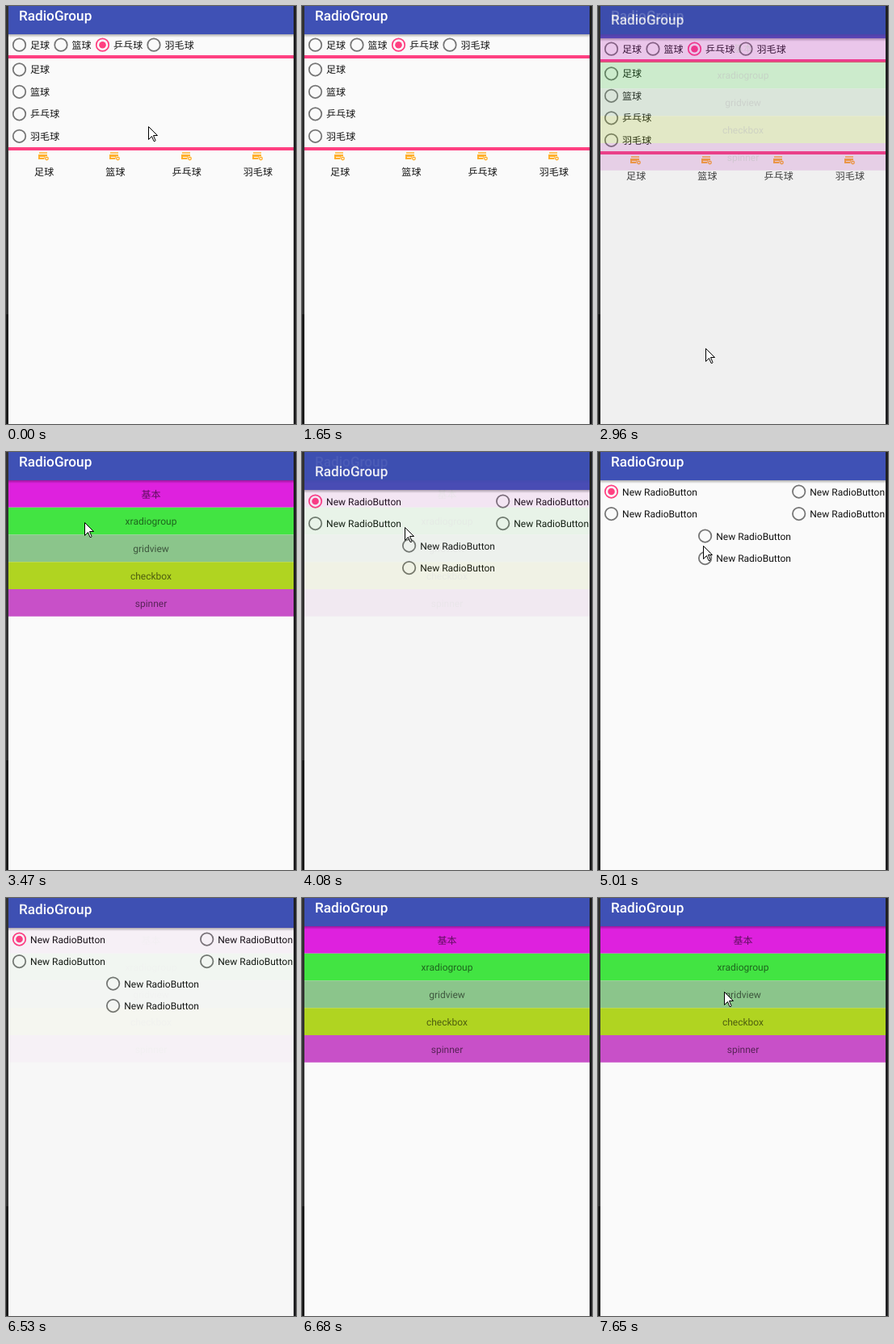
Recreate the animation shown at these times as an HTML page with a canvas. Size 359 by 518 pixels, loop 8 s.

```html
<!DOCTYPE html>
<html lang="zh-CN">
<head>
<meta charset="utf-8">
<title>RadioGroup</title>
<style>
html, body { margin: 0; width: 100%; height: 100%; overflow: hidden; background: #222; }
canvas { display: block; width: 359px; height: 518px; }
</style>
</head>
<body>
<canvas id="stage" width="359" height="518"></canvas>
<script>
const W = 359, H = 518, LEFT = 3, RIGHT = 356, BAR = 35, TOP = 60;
const LOOP = 8000, TICK = 134;
const ROW = 27.5, LINE = 4, ACCENT = '#ff4081', INK = '#111';
const FONT = 'Roboto, "Noto Sans CJK SC", "Noto Sans CJK", sans-serif';
const SPORTS = ['足球', '篮球', '乒乓球', '羽毛球'];
const ctx = document.getElementById('stage').getContext('2d');

const clamp = u => Math.min(1, Math.max(0, u));
const mix = (a, b, u) => a + (b - a) * u;

function rect(c, x, y, w, h, fill) {
  c.fillStyle = fill;
  c.fillRect(x, y, w, h);
}

// cy is the middle of the line box, as in Android text views
function text(c, str, x, cy, fill = INK, align = 'left', size = 12.03, weight = 400) {
  c.font = `${weight} ${size}px ${FONT}`;
  c.textRendering = 'geometricPrecision';
  c.textAlign = align;
  c.fillStyle = fill;
  c.fillText(str, x, cy + size * 0.3925);
}

function disc(c, x, y, r) {
  c.beginPath();
  c.arc(x, y, r, 0, Math.PI * 2);
}

function radio(c, x, y, label, on) {
  c.strokeStyle = on ? ACCENT : '#757575';
  c.lineWidth = 1.75;
  disc(c, x, y, 7.75);
  c.stroke();
  if (on) {
    c.fillStyle = ACCENT;
    disc(c, x, y, 4.3);
    c.fill();
  }
  text(c, label, x + 13.6, y);
}

function cardIcon(c, x, y) {
  const gold = '#ffb02e';
  rect(c, x - 5, y - 5, 10, 2, '#ffc766');
  rect(c, x - 6, y - 2, 11, 6, gold);
  rect(c, x - 4, y + 1, 5, 1, '#fff3dc');
  c.fillStyle = '#fafafa';
  disc(c, x + 4.5, y + 3, 3);
  c.fill();
  c.strokeStyle = gold;
  c.lineWidth = 1.4;
  disc(c, x + 4.5, y + 3, 1.7);
  c.stroke();
}

// Each screen is rendered once, with spare toolbar above for sliding.
function makePage(drawBody) {
  const page = document.createElement('canvas');
  page.width = W;
  page.height = H + TOP;
  const c = page.getContext('2d');
  c.translate(0, TOP);
  c.beginPath();
  c.rect(LEFT, -TOP, RIGHT - LEFT, H + TOP);
  c.clip();
  rect(c, 0, -TOP, W, H + TOP, '#fafafa');
  drawBody(c);
  const shade = c.createLinearGradient(0, BAR, 0, BAR + 4);
  shade.addColorStop(0, 'rgba(0,0,0,.3)');
  shade.addColorStop(1, 'rgba(0,0,0,0)');
  rect(c, 0, BAR, W, 4, shade);
  rect(c, 0, -TOP, W, TOP + BAR, '#3f51b5');
  text(c, 'RadioGroup', 16, 11.45, '#fff', 'left', 17.18, 500);
  return page;
}

const list = makePage(c => {
  const rows = [
    ['基本', '#de21de'], ['xradiogroup', '#42e442'], ['gridview', '#8bc58b'],
    ['checkbox', '#b0d421'], ['spinner', '#c850c8']
  ];
  const h = 33.75;
  rows.forEach(([label, fill], i) => {
    const y = BAR + i * h;
    rect(c, 0, y, W, h, fill);
    text(c, label, 179.5, y + h / 2, 'rgba(0,0,0,.56)', 'center');
  });
});

const sports = makePage(c => {
  const line1 = BAR + 26, line2 = line1 + LINE + 4 * ROW;
  let x = 16.5;
  SPORTS.forEach((name, i) => {
    radio(c, x, BAR + 13.2, name, i === 2);
    x += ROW + name.length * 12;
    radio(c, 16.5, line1 + LINE + ROW * (i + 0.5), name);
    const mid = mix(LEFT, RIGHT, (i + 0.5) / 4);
    cardIcon(c, Math.round(mid - 1), line2 + 11);
    text(c, name, mid, line2 + 29.8, INK, 'center');
  });
  for (const y of [line1, line2]) rect(c, 0, y, W, LINE, ACCENT);
});

const grid = makePage(c => {
  for (let i = 0; i < 6; i++) {
    const col = i < 4 ? i % 2 * 2 : 1;
    const row = i < 4 ? i >> 1 : i - 2;
    radio(c, 16.5 + col * 116.1, BAR + 14 + row * ROW, 'New RadioButton', i === 0);
  }
});

// A page opens over the list, or closes back to it; lead is the age when first seen.
const SLIDES = [
  { at: 0, page: sports, ease: open, lead: 400 },
  { at: 2960, page: sports, ease: close, lead: 82 },
  { at: 4080, page: grid, ease: open, lead: 90 },
  { at: 6530, page: grid, ease: close, lead: 36 }
];

function open(age) {
  return { alpha: 1 - (1 - clamp(age / 200)) ** 4, dy: 53 * (1 - clamp(age / 350)) ** 5 };
}

function close(age) {
  const u = clamp(age / 170);
  return { alpha: 1 - u * u, dy: 10 * u };
}

// Pointer gestures: key points are [tick, x, y].
const GESTURES = [
  { at: 0, end: 1650, keys: [[0, 176, 149], [1, 143, 209], [3, 36, 113], [5, 29, 176],
    [7, 55, 344], [8, 58, 344], [11, 120, 484]] },
  { at: 2960, end: 4080, keys: [[0, 133, 424], [4, 97, 87]] },
  { at: 4080, end: 5700, keys: [[0, 127, 93], [2, 158, 107], [4, 152, 134], [5, 147, 138],
    [8, 121, 105], [9, 130, 117], [10, 119, 406], [11, 93, 493]] },
  { at: 6830, end: LOOP, keys: [[0, 103, 325], [1, 136, 239], [2, 141, 205],
    [3, 154, 137], [6, 156, 116]] }
];

const ARROW = new Path2D('M.5 .5V16.5L4.5 12.5L7 18.5H8.5L9 17.5L6.5 11.5H11.5Z');

// The screen is sampled once per tick, so motion advances in steps.
const ticks = (t, at) => Math.floor((t - at) / TICK + 0.2);

function along(keys, n) {
  const next = keys.findIndex(key => key[0] > n);
  if (next < 0) return keys[keys.length - 1].slice(1);
  const [n0, x0, y0] = keys[next - 1], [n1, x1, y1] = keys[next];
  const u = (n - n0) / (n1 - n0);
  return [Math.round(mix(x0, x1, u)), Math.round(mix(y0, y1, u))];
}

function drawPage(page, dy, alpha) {
  ctx.globalAlpha = alpha;
  ctx.drawImage(page, 0, Math.round(dy) - TOP);
  ctx.globalAlpha = 1;
}

function drawPointer(t) {
  const move = GESTURES.find(g => t >= g.at && t < g.end);
  if (!move) return;
  ctx.save();
  ctx.translate(...along(move.keys, ticks(t, move.at)));
  ctx.lineJoin = 'round';
  ctx.fillStyle = '#fff';
  ctx.fill(ARROW);
  ctx.strokeStyle = '#000';
  ctx.stroke(ARROW);
  ctx.restore();
}

function draw(t) {
  const { at, page, ease, lead } = SLIDES.findLast(s => s.at <= t);
  const { alpha, dy } = ease(lead + ticks(t, at) * TICK);
  rect(ctx, 0, 0, W, H, '#000');
  drawPage(list, 0, 1 - 0.22 * alpha);
  drawPage(page, dy, alpha);

  rect(ctx, 0, 0, LEFT, 382, '#323232');
  rect(ctx, 0, 382, LEFT, H - 382, '#1b1b1b');
  rect(ctx, RIGHT, 0, W - RIGHT, H, '#202022');
  drawPointer(t);
}

const start = performance.now();
function tick() {
  draw((performance.now() - start) % LOOP);
  requestAnimationFrame(tick);
}
tick();
</script>
</body>
</html>
```
